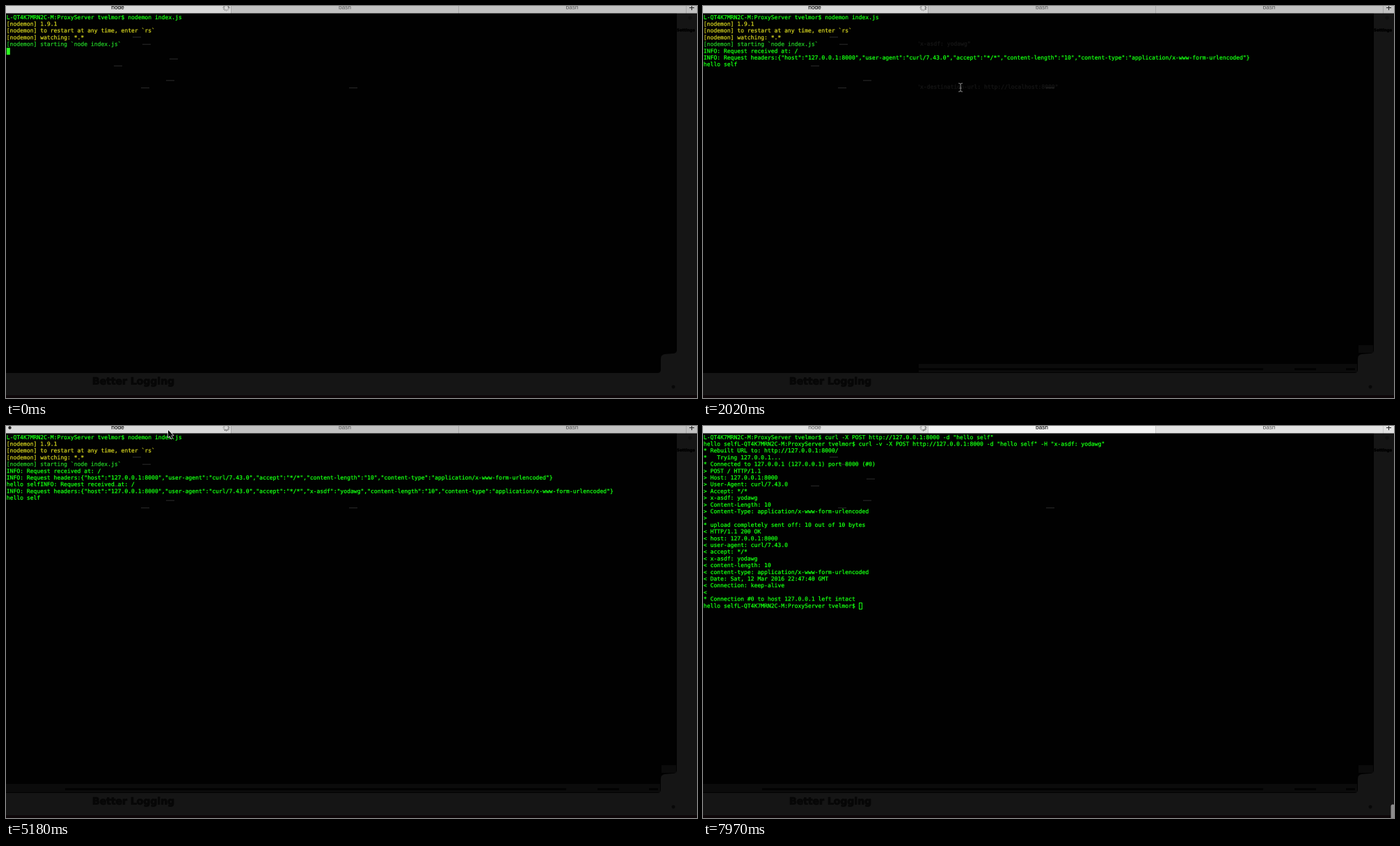
Animation of 993 by 564 pixels, one loop 8000 ms. Source, as an HTML page with a canvas:

```html
<!DOCTYPE html>
<html lang="en">
<head>
<meta charset="utf-8">
<title>Terminal session</title>
<style>
  html, body { margin: 0; width: 100%; height: 100%; overflow: hidden; background: #000; }
  canvas { display: block; width: 993px; height: 564px; }
</style>
</head>
<body>
<canvas id="stage" width="1986" height="1128"></canvas>
<script>
// Drawn at double density, so that small text keeps its fractional positions.
const ctx = document.getElementById('stage').getContext('2d');
ctx.scale(2, 2);
ctx.textRendering = 'geometricPrecision';
ctx.textBaseline = 'middle';

const LOOP = 8000, PITCH = 4.855, LINE = 9.7, BAR = 10.5;
const MONO = '8.065px "DejaVu Sans Mono", monospace';
const SANS = '8.3px "Liberation Sans", Arial, sans-serif';
const GREEN = '#14fe10', YELLOW = '#cccb1e', DIM_GREEN = '#22c826';

const prompt = 'L-QT4K7MRN2C-M:ProxyServer tvelmor$ ';
const post = 'curl -X POST http://127.0.0.1:8000 -d "hello self"';
const verbose = 'curl -v -X POST http://127.0.0.1:8000 -d "hello self" -H "x-asdf: yodawg"';

const headers = extra => 'INFO: Request headers:{"host":"127.0.0.1:8000","user-agent":"curl/7.43.0","accept":"*/*",' +
  extra + '"content-length":"10","content-type":"application/x-www-form-urlencoded"}';
const nodeStart = [prompt + 'nodemon index.js', '[nodemon] 1.9.1',
  '[nodemon] to restart at any time, enter `rs`', '[nodemon] watching: *.*',
  '[nodemon] starting `node index.js`'];
const received = 'INFO: Request received at: /';
const nodeOne = [...nodeStart, received, headers(''), 'hello self'];
const nodeTwo = [...nodeStart, received, headers(''), 'hello self' + received,
  headers('"x-asdf":"yodawg",'), 'hello self'];

const bashDone = [prompt + post, 'hello self' + prompt];
const bashTyped = [prompt + post, 'hello self' + prompt + verbose];
const bashVerbose = [...bashTyped, ...`* Rebuilt URL to: http://127.0.0.1:8000/
*   Trying 127.0.0.1...
* Connected to 127.0.0.1 (127.0.0.1) port 8000 (#0)
> POST / HTTP/1.1
> Host: 127.0.0.1:8000
> User-Agent: curl/7.43.0
> Accept: */*
> x-asdf: yodawg
> Content-Length: 10
> Content-Type: application/x-www-form-urlencoded
>
* upload completely sent off: 10 out of 10 bytes
< HTTP/1.1 200 OK
< host: 127.0.0.1:8000
< user-agent: curl/7.43.0
< accept: */*
< x-asdf: yodawg
< content-length: 10
< content-type: application/x-www-form-urlencoded
< Date: Sat, 12 Mar 2016 22:47:40 GMT
< Connection: keep-alive
<
* Connection #0 to host 127.0.0.1 left intact`.split('\n'), 'hello self' + prompt];

// ghostFrom, edgeFrom: left limits of the document text and of the lower
// window edge that shine through the terminal.
const scenes = [
  { at: 0, tab: 0, lines: [...nodeStart, ''], ghostFrom: 993, edgeFrom: 993 },
  { at: 520, tab: 1, lines: [prompt], ghostFrom: 0, edgeFrom: 0 },
  { at: 700, tab: 1, lines: [prompt + post], ghostFrom: 0, edgeFrom: 0 },
  { at: 1080, tab: 1, lines: bashDone, ghostFrom: 0, edgeFrom: 0 },
  { at: 1520, tab: 0, lines: nodeOne, ghostFrom: 310, edgeFrom: 310 },
  { at: 3550, tab: 1, lines: bashDone, ghostFrom: 120, edgeFrom: 0 },
  { at: 3720, tab: 1, lines: bashTyped, ghostFrom: 120, edgeFrom: 0 },
  { at: 3880, tab: 1, lines: bashVerbose, ghostFrom: 120, edgeFrom: 0 },
  { at: 4860, tab: 0, lines: nodeTwo, ghostFrom: 993, edgeFrom: 0 },
  { at: 6450, tab: 1, lines: bashVerbose, ghostFrom: 120, edgeFrom: 0 },
  { at: 7700, tab: 1, lines: bashVerbose, ghostFrom: 993, edgeFrom: 0, inactive: true }
];

const ghostText = [
  [45, post],
  [55, 'curl -x -X POST http://127.0.0.1:8000 -d "hello self" -H "x-asdf: yodawg"'],
  [76, 'nodemon index.js --host 127.0.0.1 --port 8000'],
  [86, 'curl -v http://127.0.0.1:8000 -d "hello proxy"'],
  [107, 'nodemon index.js --url http://localhost:8000'],
  [117, 'curl -v -X POST http://127.0.0.1:8000 -d "hello self" -H "x-destination-url: http://localhost:8000"'],
  [139, 'nodemon index.js --log log'],
  [159, 'node index.js --exec grep request index.js'],
  [170, 'node index.js --exec ls'],
  [190, 'nodemon index.js --loglevel 3'],
  [201, 'nodemon index.js --loglevel 5'],
  [222, 'nodemon index.js -h']
];
const ghostRules = [66, 97, 128, 149, 180, 211, 232];
const pills = [[188, 44.5], [202, 55], [241, 76], [161, 86], [236, 107], [200, 117.5], [499, 117.5]];

const mousePath = [
  [1230, 260, 60], [1370, 228, 1], [1700, 230, 3], [2800, 911, 558], [3400, 911, 558],
  [3900, 495, 207], [4250, 495, 207], [4800, 233, 6], [5400, 233, 6], [5800, 500, 200],
  [6100, 500, 200], [6450, 425, 0], [6900, 425, 0], [7600, 990, 562]
];

function rect(x, y, w, h, color) {
  ctx.fillStyle = color;
  ctx.fillRect(x, y, w, h);
}

function dot(x, y, r, color) {
  ctx.fillStyle = color;
  ctx.beginPath();
  ctx.arc(x, y, r, 0, 7);
  ctx.fill();
}

function segment(x1, y1, x2, y2, color, width = 1) {
  ctx.strokeStyle = color;
  ctx.lineWidth = width;
  ctx.beginPath();
  ctx.moveTo(x1, y1);
  ctx.lineTo(x2, y2);
  ctx.stroke();
}

function text(string, x, y, color, font = MONO, weight = 0) {
  ctx.font = font;
  ctx.fillStyle = ctx.strokeStyle = color;
  ctx.fillText(string, x, y);
  if (weight) {
    ctx.lineWidth = weight;
    ctx.lineJoin = 'round';
    ctx.strokeText(string, x, y);
  }
}

function clipped(left, draw) {
  ctx.save();
  ctx.beginPath();
  ctx.rect(left, 0, 993, 564);
  ctx.clip();
  draw();
  ctx.restore();
}

function drawGhost() {
  for (const [y, line] of ghostText) text(line, 31, y, '#131313', MONO, .5);
  for (const y of ghostRules) rect(31, y - .5, 233, 1, '#101010');
  for (const y of [117, 222]) dot(14, y, 1.5, '#101010');
}

function drawLowerEdge() {
  rect(0, 515, 940, 12, '#0b0b0b');
  for (const [x, w] of [[85, 720], [850, 31], [924, 13]]) rect(x, 521, w, 3, '#020202');
  rect(942, 488, 21, 11, '#0b0b0b');
}

function drawBackdrop(scene) {
  rect(0, 0, 993, 564, '#151515');
  rect(0, 560, 993, 4, '#0d0709');
  ctx.fillStyle = '#010101';
  ctx.beginPath();
  ctx.moveTo(0, 10);
  ctx.lineTo(964, 10);
  ctx.lineTo(964, 495);
  ctx.quadraticCurveTo(964, 500, 958, 500);
  ctx.lineTo(946, 501);
  ctx.quadraticCurveTo(941, 502, 941, 508);
  ctx.lineTo(941, 523);
  ctx.quadraticCurveTo(941, 528, 936, 528);
  ctx.lineTo(0, 528);
  ctx.fill();
  text('Better Logging', 124, 541, '#070707', 'bold 14px "DejaVu Sans", sans-serif', 1);
  text('Settings', 964, 35, '#000', 'bold 5.5px "DejaVu Sans", sans-serif', .5);
  dot(959, 548, 2.5, '#080808');
  dot(983, 17, 2.5, '#101010');

  clipped(scene.ghostFrom, drawGhost);
  clipped(scene.edgeFrom, drawLowerEdge);
  for (const [x, y] of pills) rect(x - 6, y - .5, 12, 1.5, '#1e1e1e');
}

function drawTerminal({ lines, inactive }, t) {
  const last = lines.length - 1;
  const lineY = row => 16.7 + row * LINE;
  lines.forEach((line, row) => {
    const color = !line.startsWith('[nodemon]') ? GREEN : line.includes('starting') ? DIM_GREEN : YELLOW;
    text(line, .8, lineY(row), color, MONO, .3);
  });
  const x = .8 + lines[last].length * PITCH, y = lineY(last) - 5;
  if (inactive) {
    ctx.strokeStyle = GREEN;
    ctx.lineWidth = 1;
    ctx.strokeRect(Math.round(x) + .5, Math.round(y) + .5, 4, 9);
  } else if (t % 1060 < 530) {
    rect(x, y, 5, 10, '#2bfe20');
  }
}

function drawTabs({ tab, inactive }, t, mouse) {
  const colors = inactive ? ['#e2e2e2', '#f4f4f4'] : ['#c2c2c2', '#dadada'];
  const edges = [0, 324, 651, 978];
  rect(0, 0, 993, BAR, colors[0]);
  rect(edges[tab], 0, edges[tab + 1] - edges[tab], BAR, colors[1]);
  for (const x of edges.slice(1)) rect(x - 1, 0, 1, BAR, inactive ? '#cacaca' : '#a8a8a8');
  ctx.textAlign = 'center';
  ['node', 'bash', 'bash'].forEach((label, i) =>
    text(label, 160.5 + i * 326.5, 2.3, i === tab ? '#111' : '#555', SANS, i === tab ? .15 : 0));
  ctx.textAlign = 'left';
  segment(982, 2.5, 989, 2.5, '#222');
  segment(985.5, -1, 985.5, 6, '#222');

  const step = Math.floor(t / 80);
  for (let i = 0; i < 12; i++) {
    const angle = i * Math.PI / 6, shade = 60 + (step + 12 - i) % 12 * 9;
    const c = Math.cos(angle), s = Math.sin(angle);
    segment(316.5 + c * 2.6, 2.5 + s * 2.6, 316.5 + c * 5, 2.5 + s * 5, `rgb(${shade},${shade},${shade})`, .9);
  }
  if (mouse && mouse.y < 10) {
    if (mouse.x < 324) {
      dot(5.5, 2.5, 2.2, '#222');
    } else if (mouse.x < 651) {
      segment(330, 0, 335, 5, '#222');
      segment(335, 0, 330, 5, '#222');
    }
  }
}

function mouseAt(t) {
  const next = mousePath.findIndex(key => key[0] > t);
  if (next < 1) return null;
  const [t0, x0, y0] = mousePath[next - 1], [t1, x1, y1] = mousePath[next];
  const p = (t - t0) / (t1 - t0), e = p * p * (3 - 2 * p);
  return { x: x0 + (x1 - x0) * e, y: y0 + (y1 - y0) * e };
}

function drawMouse({ x, y }) {
  ctx.save();
  ctx.translate(x, y);
  if (y < 12) {
    const arrow = new Path2D('M0 0V10.5L2.4 8.3L4.1 12.2L6 11.4L4.3 7.6H7.6Z');
    ctx.strokeStyle = '#eee';
    ctx.lineWidth = 1.4;
    ctx.stroke(arrow);
    ctx.fillStyle = '#000';
    ctx.fill(arrow);
  } else {
    ctx.strokeStyle = '#777';
    ctx.lineWidth = 1.2;
    ctx.stroke(new Path2D('M-3 -6Q0 -6 0 -4Q0 -6 3 -6M0 -4V4M-3 6Q0 6 0 4Q0 6 3 6M-1.5 1H1.5'));
  }
  ctx.restore();
}

function render(t) {
  const scene = scenes.findLast(s => s.at <= t);
  const mouse = mouseAt(t);
  drawBackdrop(scene);
  drawTerminal(scene, t);
  drawTabs(scene, t, mouse);
  if (t >= 2230 && t < 3550 || t >= 7600) {
    ctx.fillStyle = '#8c8c8c';
    ctx.beginPath();
    ctx.roundRect(988.5, 544.5, 6, 24, 2.5);
    ctx.fill();
  }
  if (mouse) drawMouse(mouse);
}

const start = performance.now();
function tick() {
  render((performance.now() - start) % LOOP);
  requestAnimationFrame(tick);
}
tick();
</script>
</body>
</html>
```
